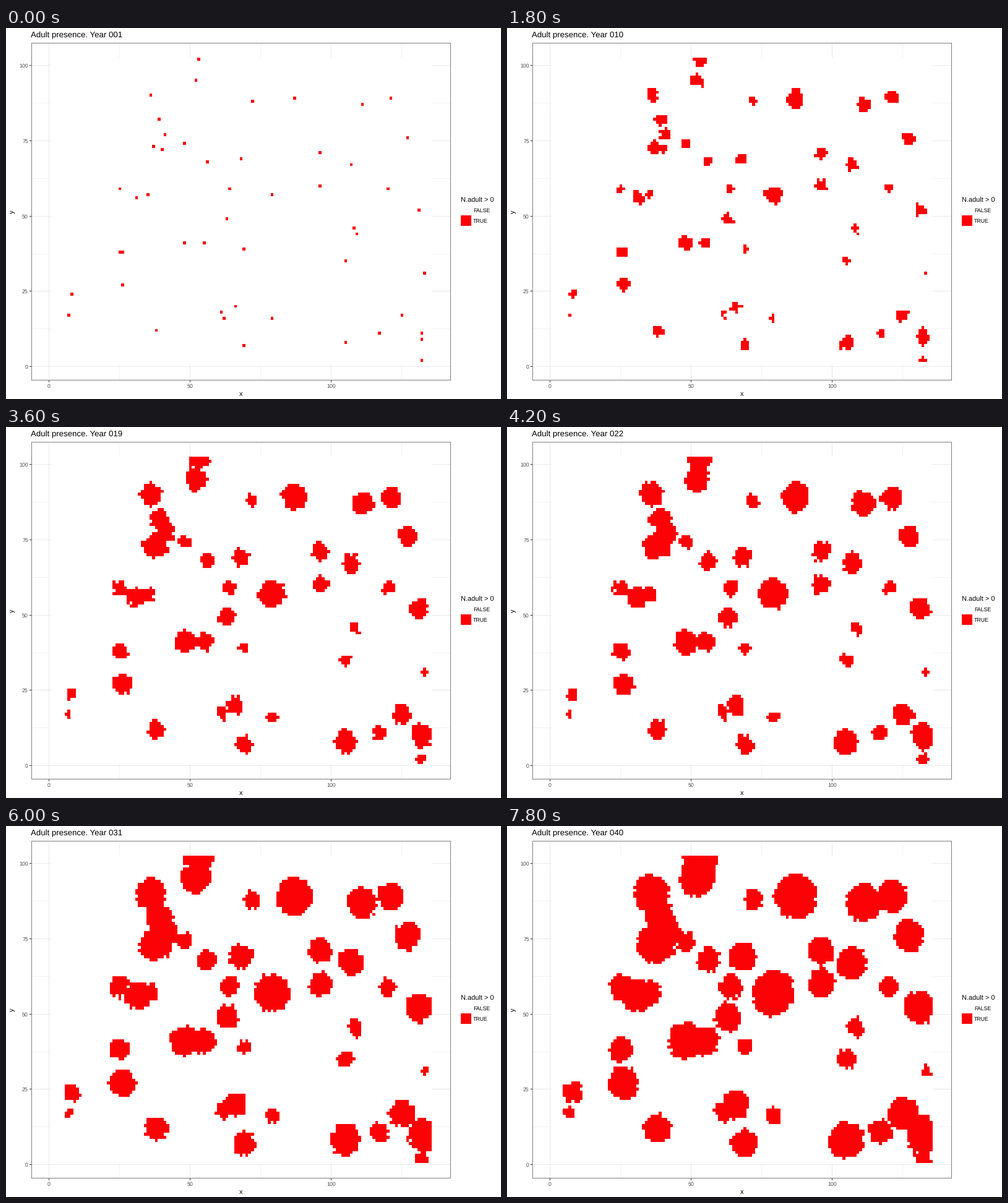
These frames come from a looping animation (800x600 px, 8 s). A matplotlib script:

```python
import numpy as np
import matplotlib.pyplot as plt
from matplotlib.animation import FuncAnimation
from matplotlib.patches import Rectangle

W, H, DPI = 800, 600, 100
YEARS, STEP = 40, 200
NX, NY = 135, 102
LEFT, TOP, RIGHT, BOTTOM = 41, 24, 718, 570
RED = (251, 2, 7)

# Founding adults, grouped by the radius their colony reaches in the end
FOUNDERS = {
    7.6: [(87, 89), (79, 57)],
    6.3: [(53, 102), (52, 95), (36, 90), (37, 73), (111, 87), (48, 41),
          (105, 8)],
    5.5: [(39, 82), (41, 77), (121, 89), (127, 76), (107, 67), (26, 27),
          (132, 11), (132, 9), (31, 56), (125, 17), (131, 52)],
    4.8: [(68, 69), (96, 71), (96, 60), (63, 49), (55, 41), (38, 12),
          (69, 7), (66, 20)],
    4.1: [(40, 72), (25, 59), (35, 57), (64, 59), (117, 11), (56, 68),
          (25, 38)],
    3.4: [(72, 88), (120, 59), (8, 24), (105, 35), (26, 38), (48, 74)],
    2.8: [(69, 39), (108, 46), (61, 18), (79, 16), (132, 2)],
    1.9: [(109, 44), (133, 31), (7, 17), (62, 16)],
}
GROWTH = .65

rng = np.random.default_rng(11)
ROUGH = rng.uniform(-.55, .55, (NY, NX))
GX, GY = np.meshgrid(np.arange(1, NX + 1), np.arange(1, NY + 1))


def px(x):
    return LEFT + (x + 6.25) * (RIGHT - LEFT) / 148.5


def py(y):
    return BOTTOM - (y + 4.6) * (BOTTOM - TOP) / 112.2


def presence(year):
    """Colour grid of the cells that hold adults in the given year."""
    age = (year - 1) / (YEARS - 1)
    adult = np.zeros((NY, NX), bool)
    for radius, places in FOUNDERS.items():
        size = max(.7, radius * age ** GROWTH)
        edge = size + ROUGH * min(1, size / 2)
        for x, y in places:
            adult |= np.hypot(GX - x, GY - y) < edge
    grid = np.full((NY, NX, 3), 255, np.uint8)
    grid[adult] = RED
    return grid


plt.rcParams["text.hinting"] = "none"
fig = plt.figure(figsize=(W / DPI, H / DPI), dpi=DPI, facecolor="white")
ax = fig.add_axes([0, 0, 1, 1])
ax.axis("off")


def box(x, y, w, h, color, z=1):
    ax.add_patch(Rectangle((x, y), w, h, fc=color, lw=0, zorder=z))


def label(x, y, text, size, color="black", **kw):
    kw = {"ha": "left", "va": "baseline", **kw}
    return ax.text(x, y, text, fontsize=size * 72 / DPI, color=color,
                   family="Liberation Sans", **kw)


def vline(x, color):
    box(int(px(x)), TOP, 1, BOTTOM - TOP, color)


def hline(y, color):
    box(LEFT, int(py(y)), RIGHT - LEFT, 1, color)


for v in range(25, 126, 50):
    vline(v, "#f2f2f2")
for v in np.arange(12.5, 100, 25):
    hline(v, "#f2f2f2")
for v in range(0, 101, 50):
    vline(v, "#e8e8e8")
    box(int(px(v)), BOTTOM, 1, 3, "#333333")
    label(px(v), 582, str(v), 8.8, "#4d4d4d", ha="center")
for v in range(0, 101, 25):
    hline(v, "#e8e8e8")
    box(LEFT - 3, int(py(v)), 3, 1, "#333333")
    label(35.8, py(v) + 3.2, str(v), 8.8, "#4d4d4d", ha="right")

cells = ax.imshow(presence(1), origin="lower", interpolation="nearest",
                  aspect="auto", zorder=2,
                  extent=(px(.5), px(NX + .5), py(.5), py(NY + .5)))
ax.set_xlim(0, W)
ax.set_ylim(H, 0)

for x in (LEFT, RIGHT):
    box(x, TOP, 1, BOTTOM - TOP, "#7f7f7f", 3)
for y in (TOP, BOTTOM - 1):
    box(LEFT, y, RIGHT - LEFT + 1, 1, "#7f7f7f", 3)

title = label(40.5, 15, "", 13.2)
label(379.5, 595, "x", 11, ha="center")
label(11, 297, "y", 11, ha="center", va="center", rotation=90)
label(735, 282, "N.adult > 0", 11)
label(755, 298, "FALSE", 8.8)
label(755, 315, "TRUE", 8.8)
box(735, 303, 17, 17, [c / 255 for c in RED])


def draw(i):
    cells.set_data(presence(i + 1))
    title.set_text(f"Adult presence. Year {i + 1:03d}")
    return cells, title


def reset():
    return draw(0)


anim = FuncAnimation(fig, draw, frames=YEARS, init_func=reset,
                     interval=STEP, repeat=True, repeat_delay=0)
plt.show()
```
